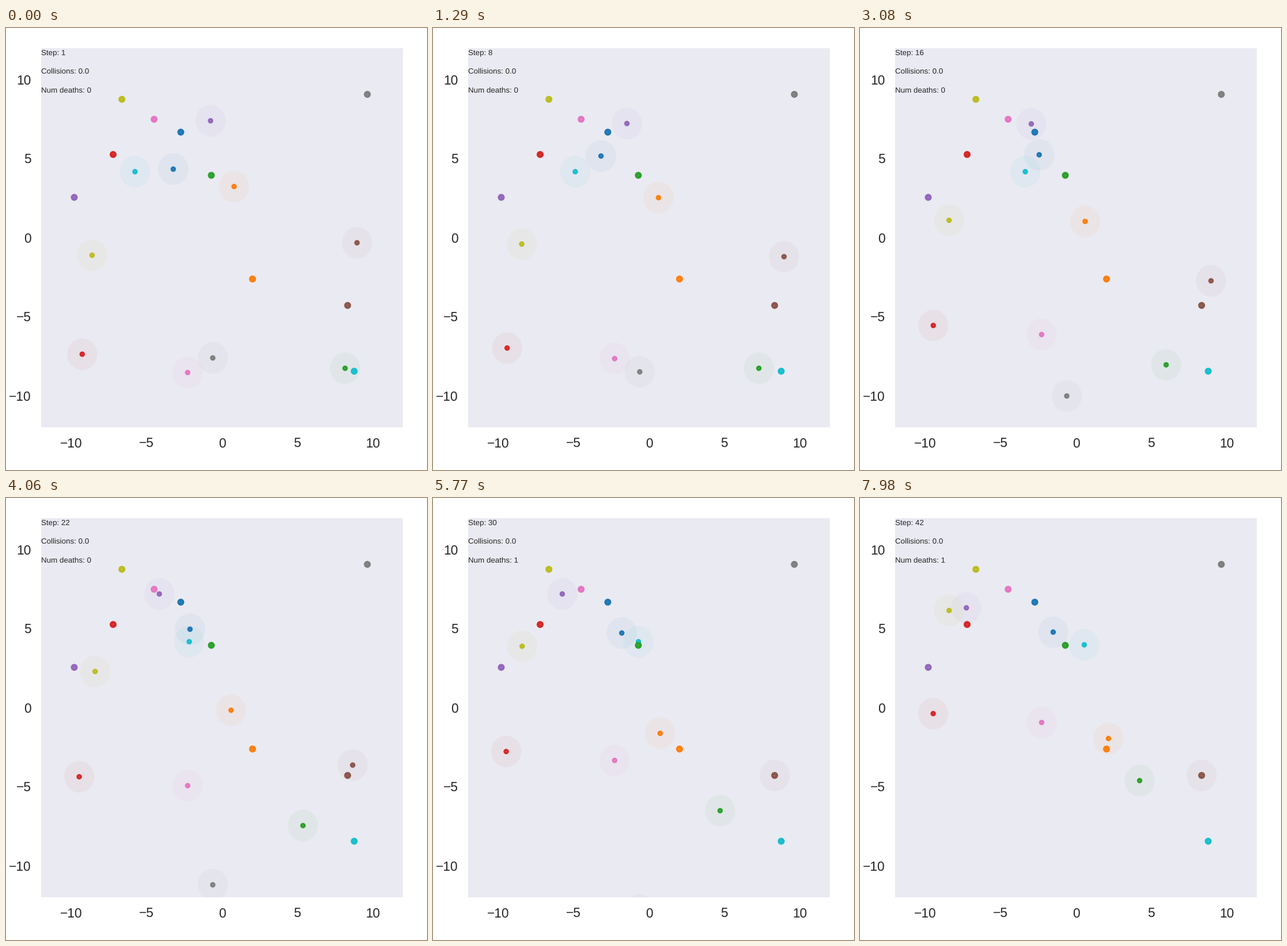
A matplotlib script for the animation above (8000 ms loop, 731 by 766 pixels).

```python
import matplotlib.pyplot as plt
import numpy as np
from matplotlib.animation import FuncAnimation
from matplotlib.collections import EllipseCollection
from matplotlib.patches import Rectangle

W, H, DPI = 731, 766, 100
LEFT, RIGHT, TOP, BOTTOM = 61.3, 688.8, 35, 692
MID = np.array([(LEFT + RIGHT) / 2, (TOP + BOTTOM) / 2])
UNIT = np.array([(RIGHT - LEFT) / 24, (BOTTOM - TOP) / 24])
INK = "#262626"
LOOP, INTERVAL = 8000, 20
STEPS = 42
ARRIVE = 0.28  # distance at which an agent settles on its goal

plt.rcParams["font.family"] = "Liberation Sans"
plt.rcParams["text.hinting"] = "none"

UP, DOWN, LEFTWARD, RIGHTWARD, COAST = (0, -1), (0, 1), (-1, 0), (1, 0), (0, 0)

# Color: start, goal, then turns as (first step, thrust)
AGENTS = {
    "blue": ((290.4, 244.6), (303.5, 180.5),
             [(1, UP), (7, RIGHTWARD), (11, DOWN), (12, (.23, .26)),
              (27, (0, -.41)), (36, (.33, .67))]),
    "orange": ((396, 274.7), (428, 435),
               [(1, LEFTWARD), (2, DOWN), (28, RIGHTWARD), (36, COAST),
                (41, RIGHTWARD)]),
    "green": ((588.8, 589.7), (356.5, 255.3),
              [(1, LEFTWARD), (12, (-.44, -.56)), (27, (-.18, -.82))]),
    "red": ((132.3, 565.3), (186, 219.2),
            [(1, COAST), (4, (-1, -1)), (5, UP)]),
    "purple": ((355.2, 160.8), (118.5, 293.5),
               [(1, DOWN), (2, LEFTWARD), (35, DOWN)]),
    "brown": ((609.5, 372.2), (593.2, 480.8),
              [(1, DOWN), (17, LEFTWARD), (19, DOWN)]),
    "pink": ((315.4, 597.1), (257.2, 158.2), [(1, UP)]),
    "gray": ((359, 571.8), (627.4, 115), [(1, DOWN)]),
    "olive": ((149.5, 393.8), (201.2, 123.6),
              [(1, RIGHTWARD), (2, UP), (38, COAST), (39, UP)]),
    "cyan": ((224, 249), (604.6, 594.8),
             [(1, RIGHTWARD), (27, (.5, 0)), (36, (.4, .28))]),
}
COLORS = ["tab:" + name for name in AGENTS]
STARTS, GOALS = (np.array([a[j] for a in AGENTS.values()]) for j in (0, 1))
TURNS = [a[2] for a in AGENTS.values()]

# The counter runs slightly unevenly: (step, ms)
PACE = [(1, 0), (2, 90), (5, 630), (8, 1290), (12, 2020), (14, 2520),
        (22, 4060), (27, 5040), (32, 6020), (36, 6750), (38, 7150), (42, 7980)]


def thrust(turns, step):
    return [push for first, push in turns if first <= step][-1]


def simulate():
    """Damped motion: velocity keeps 75% and gains 25% of the thrust."""
    pos, vel = STARTS, np.zeros_like(STARTS)
    track = [pos]
    for k in range(1, STEPS):
        vel = 0.75 * vel + 0.25 * np.array([thrust(t, k) for t in TURNS])
        pos = pos + 0.2 * UNIT * vel
        gap = np.hypot(*((pos - GOALS) / UNIT).T)
        home = (gap < ARRIVE)[:, None]
        pos, vel = np.where(home, GOALS, pos), np.where(home, 0, vel)
        # a settled agent ignores further thrust
        for i in np.flatnonzero(home):
            TURNS[i] = [(1, COAST)]
        track.append(pos)
    return track


fig = plt.figure(figsize=(W / DPI, H / DPI), dpi=DPI, facecolor="white")
ax = fig.add_axes([0, 0, 1, 1])
ax.set_xlim(0, W)
ax.set_ylim(H, 0)
ax.axis("off")
arena = Rectangle((LEFT, TOP), RIGHT - LEFT, BOTTOM - TOP, fc="#eaeaf2", lw=0)
ax.add_patch(arena)


def discs(centers, rx, ry, colors, alpha, z):
    group = EllipseCollection([2 * rx], [2 * ry], [0], units="x",
                              offsets=centers, offset_transform=ax.transData,
                              facecolors=colors, edgecolors="none",
                              linewidths=0, alpha=alpha, zorder=z)
    ax.add_collection(group, autolim=False)
    group.set_clip_path(arena)
    return group


def label(x, y, s, px, ha="left"):
    return ax.text(x, y, s, size=px * 72 / DPI, color=INK, ha=ha,
                   va="baseline", zorder=9)


for v in range(-10, 11, 5):
    s = str(v).replace("-", "\u2212")
    x, y = MID + UNIT * (v, -v)
    label(x, 727, s, 22.7, "center")
    label(43.5, y + 8.4, s, 22.7, "right")

step_text = label(LEFT, 45.8, "", 13.4)
label(LEFT, 78.6, "Collisions: 0.0", 13.4)
death_text = label(LEFT, 111.5, "", 13.4)

track = simulate()
discs(GOALS, 6, 6, COLORS, 1, 4)
discs(GOALS, 0.8, 0.6, "white", 0.4, 5)
moving = [discs(STARTS, *UNIT, COLORS, 0.05, 2),
          discs(STARTS, 4.7, 4.7, COLORS, 1, 3),
          discs(STARTS, 0.8, 0.6, "white", 0.4, 3.5)]


def draw(i):
    steps, times = zip(*PACE)
    t = i * INTERVAL + INTERVAL / 2
    step = int(np.interp(t, times, steps) + 1e-6)
    pos = track[step - 1]
    for group in moving:
        group.set_offsets(pos)
    step_text.set_text(f"Step: {step}")
    death_text.set_text(f"Num deaths: {np.sum(pos[:, 1] > BOTTOM)}")
    return [*moving, step_text, death_text]


anim = FuncAnimation(fig, draw, frames=LOOP // INTERVAL, interval=INTERVAL,
                     repeat=True, repeat_delay=0)
plt.show()
```
